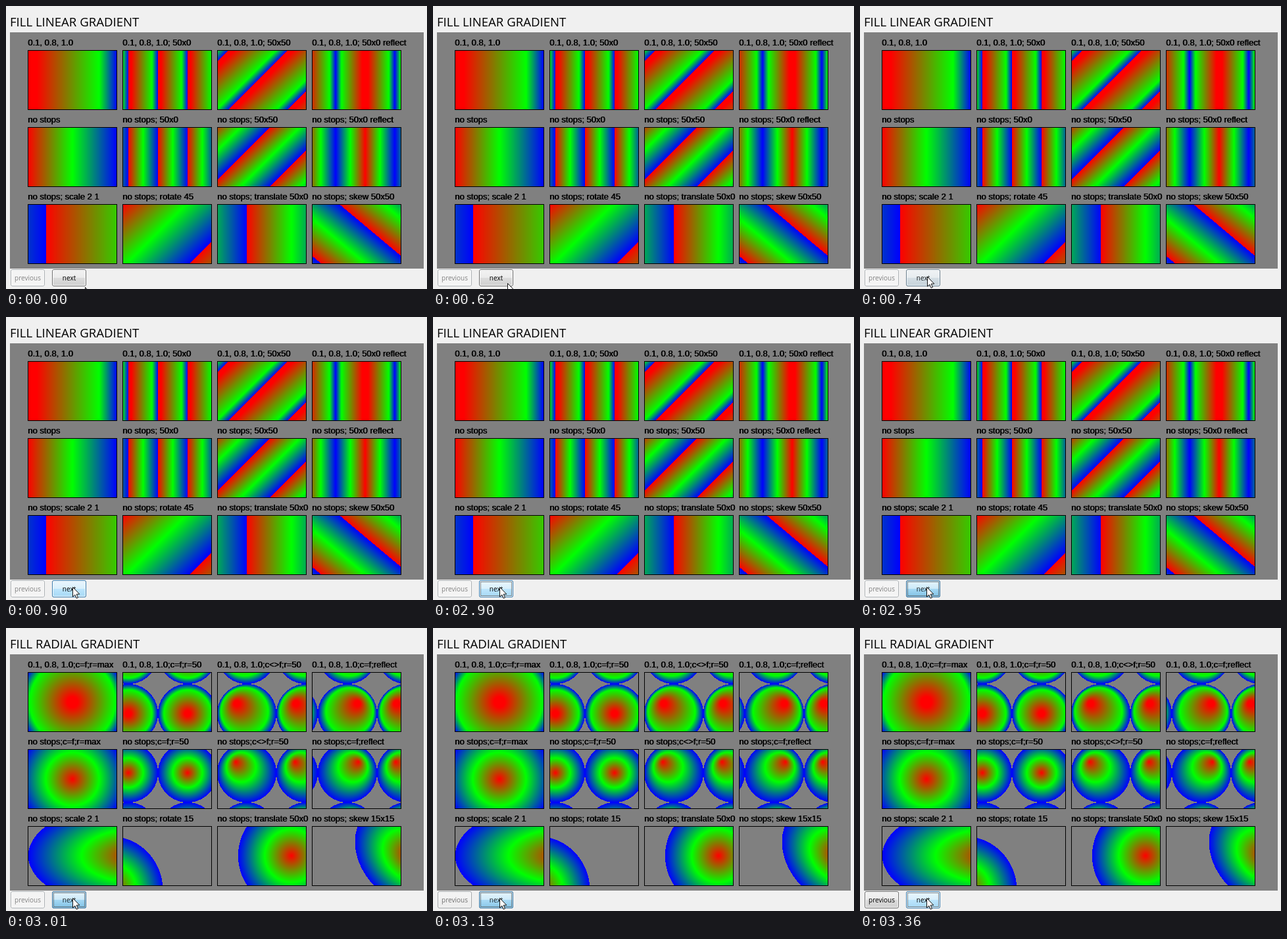
An HTML page with a canvas that plays this animation: 640 by 430 pixels, repeating every 8 s.

```html
<!DOCTYPE html>
<html lang="en">
<head>
<meta charset="utf-8">
<title>Gradient fills</title>
<style>
html, body { margin: 0; width: 100%; height: 100%; overflow: hidden; background: #f0f0f0; }
canvas { display: block; }
</style>
</head>
<body>
<canvas id="stage" width="640" height="430"></canvas>
<script>
const ctx = document.getElementById('stage').getContext('2d');
const LOOP = 8000;
const PANEL = { x: 6, y: 40, w: 629, h: 359 };
const CELL = { x: 33, y: 67, w: 135, h: 90, dx: 144, dy: 117 };
const GRAY = 128, TILE = 90, RADIUS = Math.hypot(67.5, 45);

const frac = v => v - Math.floor(v);
const clamp = v => Math.max(0, Math.min(1, v));
const mirror = v => 1 - Math.abs(1 - 2 * frac(v / 2));
const tan = deg => Math.tan(deg * Math.PI / 180);

// Red to lime to blue; a and b are the first two stops
function color(t, a, b) {
  if (t > 1) return [GRAY, GRAY, GRAY];
  if (t < b) {
    const g = clamp((t - a) / (b - a)) * 255;
    return [255 - g, g, 0];
  }
  const v = (t - b) / (1 - b) * 255;
  return [0, 255 - v, v];
}

// Shaders take coordinates relative to the panel and return the gradient offset
const bands = [
  x => clamp((x - 27.5) / 135),
  x => frac(x / 45),
  (x, y) => frac((x + y) / 90),
  x => mirror(x / 45)
];
const movedBands = [
  x => frac((x / 2 - 27.5) / 135),
  (x, y) => frac(((x + y) * Math.SQRT1_2 - 171.5) / 135),
  x => frac((x - 360.5) / 135),
  (x, y) => frac((x - tan(50) * y - 459.5) / 135)
];

const ball = (x, y) => Math.hypot(x, y) / RADIUS;

// Offset inside a circle of radius r around 0,0 whose rays start at fx,fy
function focal(x, y, fx, fy, r) {
  const dx = x - fx, dy = y - fy;
  const a = dx * dx + dy * dy;
  if (a < 1e-6) return 0;
  const b = dx * fx + dy * fy, c = fx * fx + fy * fy - r * r;
  return a / (Math.sqrt(b * b - a * c) - b);
}

function tiled(x, y, cx, fx, fy, flip) {
  const i = Math.round((x - cx) / TILE);
  const sign = flip && i % 2 ? -1 : 1;
  return focal(x - cx - i * TILE, y - TILE * Math.round(y / TILE), fx * sign, fy, TILE / 2);
}

const ballsAt = cy => [
  (x, y) => Math.min(1, ball(x - 95, y - cy)),
  (x, y) => tiled(x, y, 0, 0, 0),
  (x, y) => tiled(x, y, 0, -17, -17),
  (x, y) => tiled(x, y, 513, 17, -17, true)
];
const turn = Math.PI / 12;
const movedBalls = [
  (x, y) => ball(x / 2 - 95, y - 306),
  (x, y) => ball(x * Math.cos(turn) + y * Math.sin(turn) - 238.5,
                 y * Math.cos(turn) - x * Math.sin(turn) - 306),
  (x, y) => ball(x - 428, y - 306),
  (x, y) => ball(x - tan(15) * y - 526.5, y - 306)
];

const linearPage = {
  title: 'FILL LINEAR GRADIENT',
  rows: [bands, bands, movedBands],
  labels: [
    ['0.1, 0.8, 1.0', '0.1, 0.8, 1.0; 50x0', '0.1, 0.8, 1.0; 50x50', '0.1, 0.8, 1.0; 50x0 reflect'],
    ['no stops', 'no stops; 50x0', 'no stops; 50x50', 'no stops; 50x0 reflect'],
    ['no stops; scale 2 1', 'no stops; rotate 45', 'no stops; translate 50x0', 'no stops; skew 50x50']
  ]
};
const radialPage = {
  title: 'FILL RADIAL GRADIENT',
  rows: [ballsAt(72.5), ballsAt(189.5), movedBalls],
  labels: [
    ['0.1, 0.8, 1.0;c=f;r=max', '0.1, 0.8, 1.0;c=f;r=50', '0.1, 0.8, 1.0;c<>f;r=50', '0.1, 0.8, 1.0;c=f;reflect'],
    ['no stops;c=f;r=max', 'no stops;c=f;r=50', 'no stops;c<>f;r=50', 'no stops;c=f;reflect'],
    ['no stops; scale 2 1', 'no stops; rotate 15', 'no stops; translate 50x0', 'no stops; skew 15x15']
  ]
};

function paintCell(g, shader, x0, y0, a, b) {
  const img = g.createImageData(CELL.w, CELL.h);
  for (let y = 0, p = 0; y < CELL.h; y++) {
    for (let x = 0; x < CELL.w; x++, p += 4) {
      const t = shader(x0 + x + 0.5 - PANEL.x, y0 + y + 0.5 - PANEL.y);
      img.data.set([...color(t, a, b), 255], p);
    }
  }
  g.putImageData(img, x0, y0);
  g.strokeStyle = '#000';
  g.lineWidth = 1;
  g.strokeRect(x0 + 0.5, y0 + 0.5, CELL.w, CELL.h);
}

function renderPage(page) {
  const canvas = document.createElement('canvas');
  canvas.width = 640;
  canvas.height = 430;
  const g = canvas.getContext('2d');
  g.fillStyle = '#f0f0f0';
  g.fillRect(0, 0, 640, 430);
  g.fillStyle = '#808080';
  g.fillRect(PANEL.x, PANEL.y, PANEL.w, PANEL.h);
  g.fillStyle = '#000';
  g.font = '18.6px "Open Sans", "Noto Sans", sans-serif';
  g.fillText(page.title, 6, 30.5);
  g.font = '13px "Liberation Sans", Arial, sans-serif';
  page.rows.forEach((row, r) => row.forEach((shader, c) => {
    const x = CELL.x + c * CELL.dx, y = CELL.y + r * CELL.dy;
    paintCell(g, shader, x, y, r ? 0 : 0.1, r ? 0.5 : 0.8);
    // Drawn twice for a heavier stroke at regular widths
    g.fillText(page.labels[r][c], x, y - 7);
    g.fillText(page.labels[r][c], x + 0.7, y - 7);
  }));
  return canvas;
}

const STYLES = {
  off: { edge: '#adb2b5', shine: '#fbfbfb', text: '#838383', fill: ['#f4f4f4', '#f4f4f4', '#f4f4f4', '#f4f4f4'] },
  idle: { edge: '#707070', shine: '#fcfcfc', text: '#000', fill: ['#f2f2f2', '#ebebeb', '#dddddd', '#cfcfcf'] },
  hover: { edge: '#3c7fb1', shine: '#f5fbfe', text: '#000', fill: ['#eaf6fd', '#d9f0fc', '#bee6fd', '#a7d9f5'] },
  down: { edge: '#2c628b', shine: '#a9cfe4', text: '#000', fill: ['#e5f4fc', '#c4e5f6', '#98d1ef', '#68b3db'] }
};

function box(x, y, w, h, r) {
  ctx.beginPath();
  ctx.roundRect(x, y, w, h, r);
}

function button(x, label, style, alpha) {
  if (!alpha) return;
  const y = 400, w = 52, h = 25, s = STYLES[style];
  const grad = ctx.createLinearGradient(0, y, 0, y + h);
  [0, 0.5, 0.5, 1].forEach((stop, i) => grad.addColorStop(stop, s.fill[i]));
  ctx.globalAlpha = alpha;
  ctx.lineWidth = 1;
  box(x + 0.5, y + 0.5, w - 1, h, 2.5);
  ctx.fillStyle = grad;
  ctx.fill();
  ctx.strokeStyle = s.edge;
  ctx.stroke();
  box(x + 1.5, y + 1.5, w - 3, h - 2, 1.5);
  ctx.strokeStyle = s.shine;
  ctx.stroke();
  ctx.fillStyle = s.text;
  ctx.font = '10px "Open Sans", "Noto Sans", sans-serif';
  ctx.textAlign = 'center';
  ctx.fillText(label, x + w / 2, y + 16.5);
  ctx.globalAlpha = 1;
}

function focusRing() {
  ctx.setLineDash([1, 1]);
  ctx.strokeStyle = '#222';
  ctx.strokeRect(72.5, 402.5, 47, 21);
  ctx.setLineDash([]);
}

const ARROW = [[0, 0], [0, 14.6], [3.3, 11.5], [5.6, 16.8], [8, 15.8], [5.7, 10.7], [10.3, 10.6]];

function cursor([x, y]) {
  ctx.beginPath();
  ARROW.forEach(([px, py]) => ctx.lineTo(x + 0.5 + px, y + 0.5 + py));
  ctx.closePath();
  ctx.fillStyle = '#fff';
  ctx.fill();
  ctx.strokeStyle = '#111';
  ctx.lineWidth = 1;
  ctx.stroke();
}

function cursorAt(t) {
  if (t < 620) return [120, 427];
  if (t < 680) return [113, 421];
  if (t < 735) return [106, 414];
  if (t < 790) return [102, 411];
  return [101, 410];
}

// Fade from 0 to 1 in n equal jumps
const steps = (t, from, to, n) => clamp(Math.floor((t - from) / (to - from) * n + 1e-6) / n);

const first = renderPage(linearPage), second = renderPage(radialPage);

function draw(t) {
  const release = steps(t, 3010, 3360, 5);
  const press = t < 2950 ? 0 : t < 3010 ? 0.6 : 0.6 * (1 - release);
  ctx.drawImage(t < 3010 ? first : second, 0, 0);
  button(7, 'previous', 'off', 1);
  button(7, 'previous', 'idle', release);
  button(70, 'next', 'idle', 1);
  button(70, 'next', 'hover', steps(t, 680, 900, 4));
  button(70, 'next', 'down', press);
  if (t >= 2900) focusRing();
  cursor(cursorAt(t));
}

const start = performance.now();
function tick() {
  draw((performance.now() - start) % LOOP);
  requestAnimationFrame(tick);
}
tick();
</script>
</body>
</html>
```
